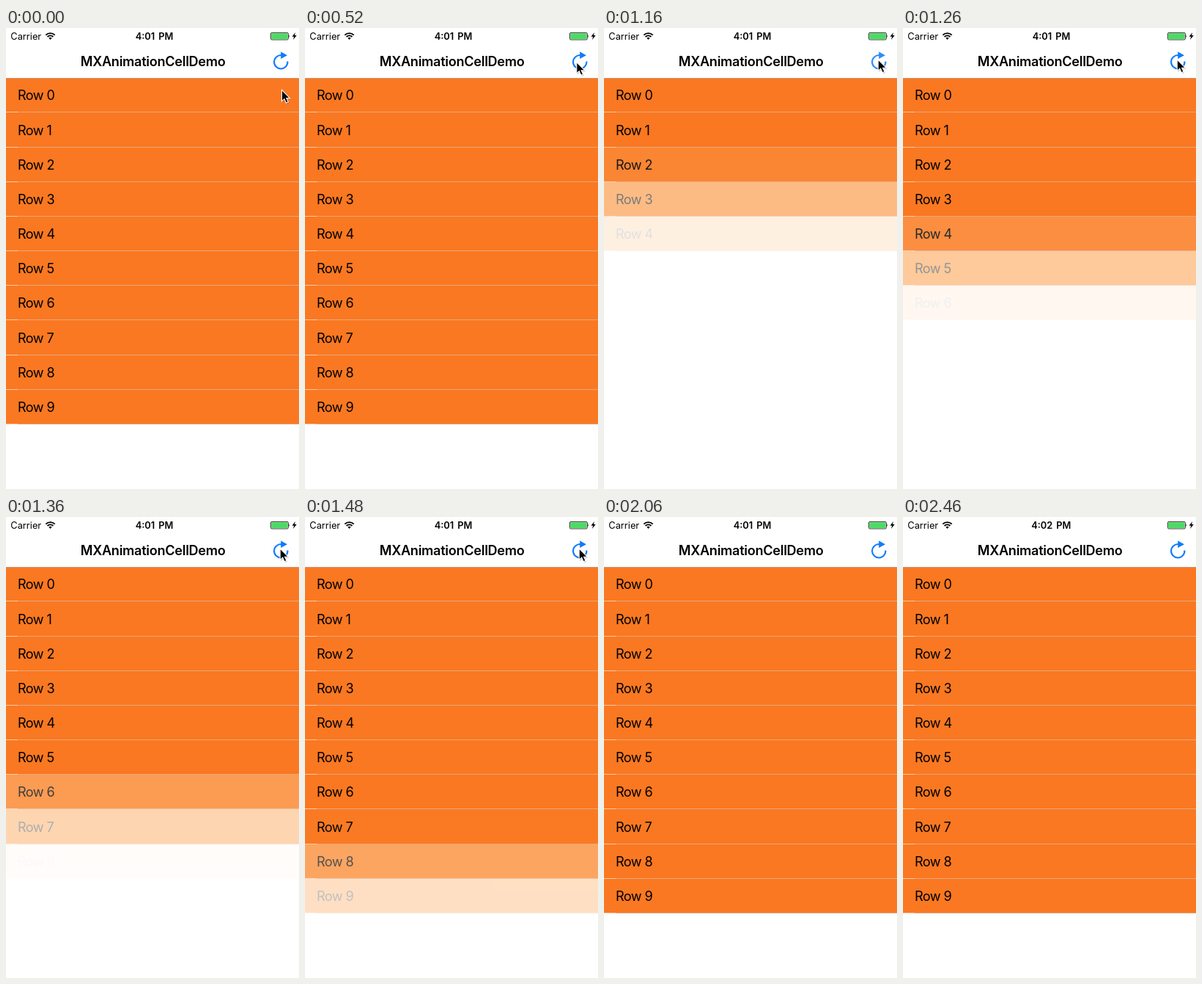
These frames come from a looping animation (400x628 px, 2540 ms). An HTML page:

```html
<!DOCTYPE html>
<html lang="en">
<head>
<meta charset="utf-8">
<title>MXAnimationCellDemo</title>
<style>
  html, body { margin: 0; height: 100%; overflow: hidden; background: #fff; }
  svg { display: block; width: 100%; height: 100%; }
  text { font-family: Inter, Roboto, sans-serif; }
  .row text { font-size: 18.1px; letter-spacing: -.033em; }
  .title { font-size: 18.1px; font-weight: 600; letter-spacing: -.016em; text-anchor: middle; }
  .status { font-size: 12.8px; }
  .clock { font-weight: 600; word-spacing: 1.8px; text-anchor: middle; }
</style>
</head>
<body>
<svg viewBox="0 0 400 628">
  <g id="rows"></g>
  <rect y="68" width="400" height="1" fill="#a8a8ac" opacity=".6"/>

  <text class="status" x="6.3" y="15.6">Carrier</text>
  <g fill="none" stroke="#000" stroke-width="1.9">
    <path d="M54.3 9.6a8.9 8.9 0 0 1 12.4 0M56.6 12a5.6 5.6 0 0 1 7.8 0"/>
    <path d="M60.5 16l-2.1-2.2a3 3 0 0 1 4.2 0z" fill="#000" stroke="none"/>
  </g>
  <text class="status clock" id="before" x="202.5" y="15.6">4:01 PM</text>
  <text class="status clock" id="after" x="202.2" y="15.6">4:02 PM</text>
  <rect x="361.4" y="6.4" width="24" height="9.6" rx="1.6" fill="none" stroke="#000" stroke-width=".8"/>
  <rect x="362.2" y="7.2" width="22.4" height="8" rx=".7" fill="#4cd964"/>
  <path d="M386.4 9.3q1.6 1.9 0 3.8z"/>
  <path d="M395 6l-4.4 5.8h2.6l-1.2 4.2 4.8-6h-2.8z"/>

  <text class="title" x="200.7" y="51.6">MXAnimationCellDemo</text>
  <g id="refresh" fill="#107cfb">
    <path d="M376 37.1a9.2 9.2 0 1 0 8.4 8.4" fill="none" stroke="#107cfb" stroke-width="2.1"/>
    <path d="M375.2 32.3l8.8 4.9-8.8 4.9z"/>
  </g>

  <g id="cursor">
    <path d="M1 2v15l3.6-3.2 2.5 5.5 2.8-1.2-2.4-5.4h5z" opacity=".22"/>
    <path d="M0 0v15.4l3.5-3.2 2.5 5.5 2.8-1.2-2.4-5.3h4.7z" stroke="#fff" stroke-width="1.1"/>
  </g>
</svg>
<script>
const LOOP = 2540, TOP = 68.27, PITCH = 47.17;
const PRESS = 740, RELEASE = 842, FIRST = 851, STAGGER = 66, FADE = 220;
const $ = id => document.getElementById(id);
const clamp = x => Math.min(1, Math.max(0, x));
const smooth = x => (x = clamp(x), x * x * (3 - 2 * x));
const mix = (a, b, f) => a + (b - a) * f;

// Row edges and separators sit on whole pixels
const edge = i => Math.round(TOP + i * PITCH);

$('rows').innerHTML = Array.from({ length: 10 }, (_, i) => {
  const top = edge(i), height = edge(i + 1) - top;
  return `
  <g class="row">
    <rect y="${top}" width="400" height="${height}"/>
    <rect y="${top + height - 1}" width="16" height="1" fill="#fff" opacity=".6"/>
    <rect x="16" y="${top + height - 1}" width="384" height="1" fill="#d5d0cc" opacity=".55"/>
    <text x="16" y="${TOP + i * PITCH + 30.1}">Row ${i}</text>
  </g>`;
}).join('');
const rows = document.querySelectorAll('.row');

// Cursor stops: time, x, y
const path = [
  [0, 376.5, 84.5], [260, 373.5, 60], [500, 370.8, 46.5], [560, 370.8, 46.5],
  [680, 374.2, 43], [1590, 374.2, 43], [1680, 367, 122], [1760, 354.8, 221.7],
  [1900, 338, 425], [2060, 318, 632], [LOOP, 318, 632]
];

function cursorAt(t) {
  const k = path.findIndex(p => p[0] > t);
  const [t0, x0, y0] = path[k - 1], [t1, x1, y1] = path[k];
  const f = (t - t0) / (t1 - t0);
  return [mix(x0, x1, f), mix(y0, y1, f)];
}

function rowAlpha(i, t) {
  if (t < RELEASE) return 1;
  const hurried = t + 34 * clamp((t - 1160) / 200);
  return smooth((hurried - FIRST - STAGGER * i) / FADE);
}

function draw(t) {
  rows.forEach((row, i) => {
    const a = rowAlpha(i, t);
    row.style.opacity = a;
    // The orange is purer while the row is still faint
    row.firstElementChild.style.fill = `rgb(${mix(255, 250, a)} ${mix(128, 120, a)} ${mix(0, 33, a)})`;
  });
  $('refresh').style.opacity = t < PRESS ? 1 : .2 + .8 * clamp((t - RELEASE) / 380);
  const tick = clamp((t - 2330) / 120);
  $('before').style.opacity = 1 - tick;
  $('after').style.opacity = tick;
  $('cursor').setAttribute('transform', `translate(${cursorAt(t)})`);
}

const begin = performance.now();
function frame() {
  draw((performance.now() - begin) % LOOP);
  requestAnimationFrame(frame);
}
frame();
</script>
</body>
</html>
```
